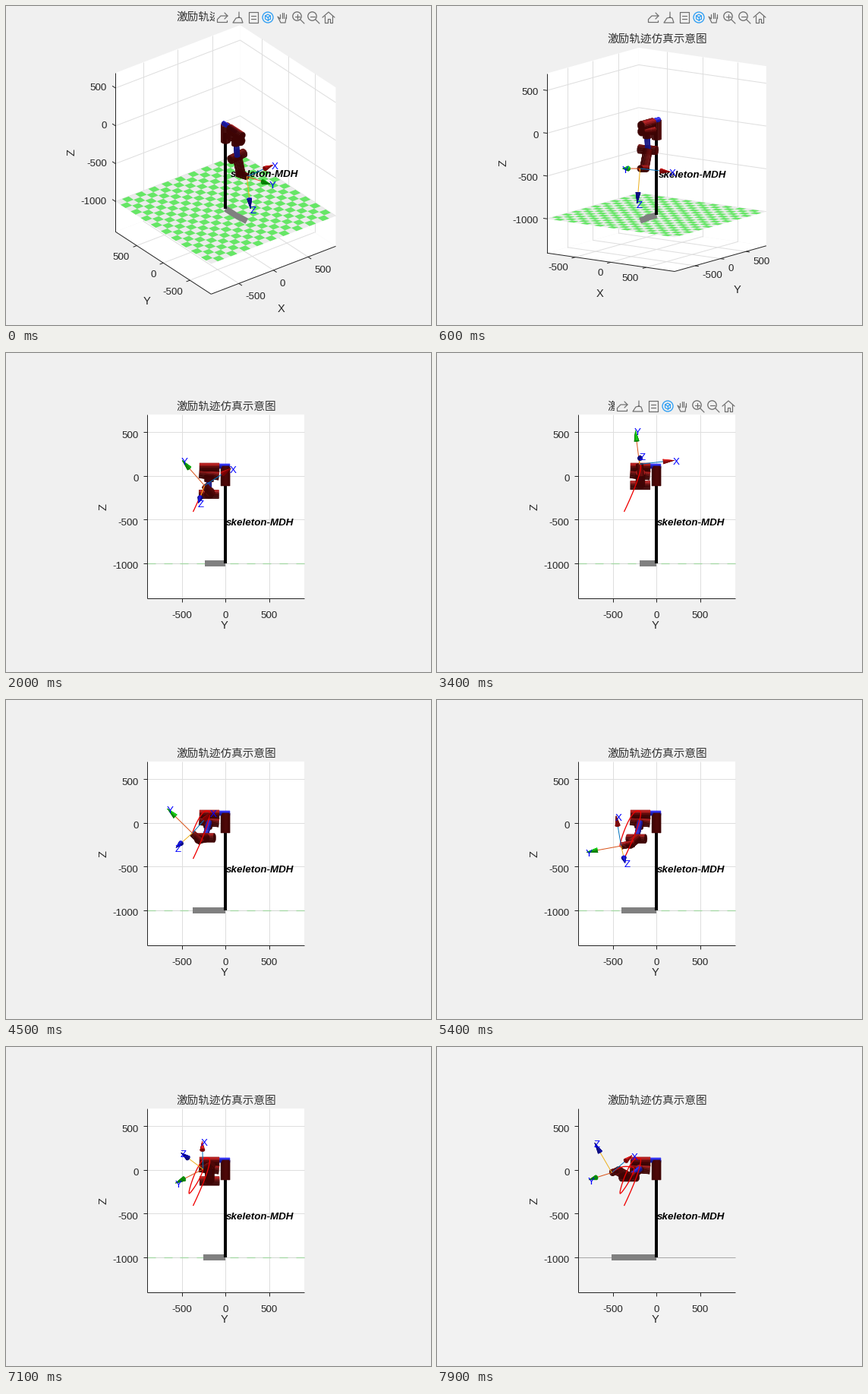
Write a matplotlib script that moves like this. It is 560 px wide and 420 px high and loops after 8 s.

```python
import numpy as np
import matplotlib.pyplot as plt
from matplotlib.animation import FuncAnimation
from matplotlib.collections import LineCollection, PolyCollection
from matplotlib.patches import Circle, Polygon, Rectangle

W, H, FRAMES = 560, 420, 80
PX = 0.72                       # points per pixel at 100 dpi
SCALE, CX, CY = 0.115, 289.4, 202.2
LIM, ZLO, ZHI, FLOOR = 900, -1400, 700, -1000
MID = np.array([0, 0, -350])
TICKS, ZTICKS = (-500, 0, 500), (-1000, -500, 0, 500)
TILES = 19
INK, GRAY, ICON, HOT = '#262626', '#f0f0f0', '#6e6e6e', '#2a9df4'
RED, BLUE = np.array([1, 0.06, 0.06]), np.array([0.15, 0.15, 1])
LIGHT = np.array([0.6, 0, 0.8])
SHOULDER, LINK, HAND = np.array([0, -190, 15]), 226, 100


def unit(v):
    return v / max(np.linalg.norm(v), 1e-9)


def swing(t, *turns):
    """Cosine motion between (time, value) turning points."""
    ts, vs = zip(*turns)
    i = int(np.clip(np.searchsorted(ts, t) - 1, 0, len(ts) - 2))
    u = np.clip((t - ts[i]) / (ts[i + 1] - ts[i]), 0, 1)
    return vs[i] + (vs[i + 1] - vs[i]) * (1 - np.cos(np.pi * u)) / 2


def tool_at(t):
    return np.array([
        swing(t, (3, 20), (32, 340), (90, 250)),
        swing(t, (2, -373), (31, -182), (50, -420), (72, -258), (84, -663)),
        swing(t, (2, -410), (36, 140), (51.5, -270), (76, 40), (86, -300))])


def tool_axes(t):
    """Heading in the side plane, lean towards the viewer, roll about Y."""
    a = np.radians(swing(t, (5, 170), (34, 97), (62, 212), (90, 190)))
    b = np.radians(swing(t, (4, 5), (19, 17), (34, -14), (52, 2), (88, -55)))
    r = np.radians(swing(t, (4, 90), (31, -7), (47, 40), (85, -80)))
    y = np.array([np.sin(b), np.cos(b) * np.cos(a), np.cos(b) * np.sin(a)])
    side = np.array([np.cos(b), -np.sin(b) * np.cos(a), -np.sin(b) * np.sin(a)])
    z = np.cos(r) * side + np.sin(r) * np.array([0, -np.sin(a), np.cos(a)])
    return np.cross(y, z), y, z


def elbow_at(wrist):
    """Two equal links, the elbow hanging down."""
    reach = wrist - SHOULDER
    d = unit(reach)
    down = np.array([0, 0, -1])
    sag = np.sqrt(max(0, LINK**2 - reach @ reach / 4))
    return SHOULDER + reach / 2 + sag * unit(down - d * (d @ down))


class View:
    """Orthographic camera that turns to the side view."""

    def __init__(self, n):
        self.az = min(90, -37.5 + 12.2 * n)
        self.el = max(0, 30 - 3.07 * n)
        a, e = np.radians([self.az, self.el])
        sa, ca, se, ce = np.sin(a), np.cos(a), np.sin(e), np.cos(e)
        self.m = np.round([(ca, sa, 0), (-sa * se, ca * se, ce),
                           (sa * ce, -ca * ce, se)], 6)
        self.cam = self.m[2]

    def __call__(self, pts):
        q = (np.asarray(pts, float) - MID) @ self.m.T
        return np.stack([CX + SCALE * q[..., 0], CY - SCALE * q[..., 1]], -1)

    def dir(self, v, fallback):
        d = self.m[:2] @ np.array(v, float) * (1, -1)
        return unit(d) if np.linalg.norm(d) > 0.02 else np.array(fallback, float)


class Solids:
    """Collects lit facets and paints them back to front."""

    def __init__(self, view):
        self.view, self.items = view, []

    def face(self, pts, normal, color, ambient):
        if normal @ self.view.cam <= 0:
            return
        lit = max(0, normal @ LIGHT) ** 4
        rgb = np.clip(color * (ambient + 0.4 * lit) + 0.1 * lit, 0, 1)
        self.items.append((pts.mean(0) @ self.view.cam, self.view(pts), rgb))

    def tube(self, a, b, r0, r1, color, ambient=0.24, sides=20):
        a, b = np.array(a, float), np.array(b, float)
        axis = unit(b - a)
        u = unit(np.cross(axis, (0, 0, 1) if abs(axis[2]) < 0.9 else (1, 0, 0)))
        w = np.cross(axis, u)
        t = np.linspace(0, 2 * np.pi, sides + 1)[:, None]
        ring = np.cos(t) * u + np.sin(t) * w
        lo, hi = a + r0 * ring, b + r1 * ring
        slope = axis * (r0 - r1) / max(np.linalg.norm(b - a), 1)
        for i in range(sides):
            quad = np.array([lo[i], lo[i + 1], hi[i + 1], hi[i]])
            self.face(quad, unit(ring[i] + ring[i + 1] + 2 * slope), color, ambient)
        self.face(lo, -axis, color, ambient)
        if r1:
            self.face(hi, axis, color, ambient)

    def joint(self, center, axis, half, r):
        d = unit(np.array(axis, float)) * half
        self.tube(center - d, center + d, r, r, RED)

    def paint(self, z):
        self.items.sort(key=lambda f: f[0])
        _, polys, cols = zip(*self.items)
        ax.add_collection(PolyCollection(polys, facecolors=cols, edgecolors=cols,
                                         linewidths=0.3, zorder=z))


fig = plt.figure(figsize=(W / 100, H / 100), dpi=100, facecolor=GRAY)
ax = fig.add_axes([0, 0, 1, 1])


def line(pts, color, width, z, cap='butt'):
    p = np.asarray(pts)
    ax.plot(p[:, 0], p[:, 1], color=color, lw=width * PX, zorder=z,
            solid_capstyle=cap, solid_joinstyle='round')


def lines(segments, color, width, z):
    ax.add_collection(LineCollection(segments, colors=color,
                                     linewidths=width * PX, zorder=z))


def label(x, y, s, size=13.33, color=INK, z=9, ha='center',
          font='Liberation Sans', **kw):
    ax.text(x, y + 0.36 * size, s, fontsize=size * PX, color=color, ha=ha,
            va='baseline', family=font, zorder=z, **kw)


def rect(axis, at, lo, hi):
    """Corners of a box-wide rectangle that is constant along one axis."""
    corners = [[-LIM, lo], [LIM, lo], [LIM, hi], [-LIM, hi]]
    return np.insert(np.array(corners, float), axis, at, axis=1)


def draw_box(view):
    """White back walls with grid lines."""
    bx = LIM if view.az < 0 else -LIM
    for wall in (rect(0, bx, ZLO, ZHI), rect(1, LIM, ZLO, ZHI), rect(2, ZLO, -LIM, LIM)):
        ax.add_patch(Polygon(view(wall), fc='white', ec='none', zorder=1))
    grid = [[(bx, t, ZLO), (bx, t, ZHI)] for t in TICKS]
    grid += [[(bx, -LIM, t), (bx, LIM, t)] for t in ZTICKS]
    if view.az < 89:
        grid += [[(t, LIM, ZLO), (t, LIM, ZHI)] for t in TICKS]
        grid += [[(-LIM, LIM, t), (LIM, LIM, t)] for t in ZTICKS]
    if view.el > 0:
        grid += [[(t, -LIM, ZLO), (t, LIM, ZLO)] for t in TICKS]
        grid += [[(-LIM, t, ZLO), (LIM, t, ZLO)] for t in TICKS]
    lines(view(grid), '#dedede', 1, 2)


def draw_floor(view, washed):
    edge = np.linspace(-LIM, LIM, TILES + 1)
    if view.el == 0:
        row = view([(0, y, FLOOR) for y in edge])
        line(row, '#a8a8a8' if washed else '#d2d6d2', 1, 3)
        if not washed:
            lines([row[i:i + 2] for i in range(0, TILES, 2)], '#a4d8a4', 1.3, 3)
        return
    ax.add_patch(Polygon(view(rect(2, FLOOR, -LIM, LIM)), fc='#ebebeb', ec='none', zorder=3))
    tiles = [[(edge[i + a], edge[j + b], FLOOR) for a, b in ((0, 0), (1, 0), (1, 1), (0, 1))]
             for i in range(TILES) for j in range(TILES) if (i + j) % 2]
    ax.add_collection(PolyCollection(view(tiles), facecolors='#66e666', zorder=3))


def draw_axes(view):
    fx = -LIM if view.az < 0 else LIM

    def ruler(ends, points, out, fallback):
        """Axis line with ticks; returns the outward direction and label spots."""
        d = view.dir(out, fallback)
        spots = view(points)
        line(view(ends), INK, 1, 8)
        lines([(p, p + 5 * d) for p in spots], INK, 1, 8)
        return d, spots

    def flat(name, ends, points, out, shift):
        d, spots = ruler(ends, points, out, (0, 1))
        ha = 'center' if abs(d[0]) < 0.2 else 'left' if d[0] > 0 else 'right'
        for v, (x, y) in zip(TICKS, spots):
            label(x + 10 * d[0], y + 10 + 11 * abs(d[1]), str(v), ha=ha)
        x, y = view(ends).mean(0)
        label(x + shift * d[0] - 2 * d[1], y + 34.5 + view.el / 2, name, 14.67)

    if view.az < 86:
        flat('X', [(-LIM, -LIM, ZLO), (LIM, -LIM, ZLO)],
             [(t, -LIM, ZLO) for t in TICKS], (0, -1, 0), 14)
    flat('Y', [(fx, -LIM, ZLO), (fx, LIM, ZLO)],
         [(fx, t, ZLO) for t in TICKS], (np.sign(fx), 0, 0), 23)

    ends = [(-LIM, -fx, ZLO), (-LIM, -fx, ZHI)]
    out = (0, 1, 0) if view.az < 0 else (-1, 0, 0)
    d, spots = ruler(ends, [(-LIM, -fx, t) for t in ZTICKS], out, (-1, 0))
    for v, (x, y) in zip(ZTICKS, spots):
        label(x - 11.5, y + 2.4 + 7 * d[1], str(v), ha='right')
    x, y = view(ends).mean(0)
    ax.text(x - 57.5, y, 'Z', fontsize=14.67 * PX, color=INK, rotation=90,
            ha='center', va='center', family='Liberation Sans', zorder=9)


def draw_toolbar(right, y):
    """Export, brush, tips, rotate, pan, zoom in, zoom out and home."""
    ax.add_patch(Rectangle((right - 160, y - 10), 160, 19.5, fc=GRAY, ec='none', zorder=11))
    xs = right - 10 - 20 * np.arange(7, -1, -1)

    def stroke(i, *pts, color=ICON):
        line(np.array(pts) + (xs[i], y), color, 1.2, 12, 'round')

    def ring(i, r, shift=0, color=ICON):
        ax.add_patch(Circle((xs[i] + shift, y + shift), r, fc='none', ec=color,
                            lw=1.3 * PX, zorder=12))

    stroke(0, (-7, 2), (-7, 6), (6, 6), (6, 4))
    stroke(0, (-6, 2), (-2, -2), (7, -2), (3, -6))
    stroke(0, (7, -2), (3, 2))
    stroke(1, (2, -7), (2, 0), (-2, 1), (-6, 7), (7, 7), (5, 1), (2, 0))
    stroke(2, (-5, -7), (7, -7), (7, 7), (-5, 7), (-5, -7))
    for dy in (-2, 2):
        stroke(2, (-2, dy), (4, dy))
    ring(3, 7, color=HOT)
    cube = [4 * np.array([np.cos(a), np.sin(a)]) for a in np.pi / 6 + np.pi / 3 * np.arange(7)]
    stroke(3, *cube, color=HOT)
    for corner in cube[1:6:2]:
        stroke(3, (0, 0), corner, color=HOT)
    for k in range(4):
        stroke(4, (2.4 * k - 3.6, 1), (2.4 * k - 3.6, -4 - 2 * (k in (1, 2))))
    stroke(4, (-3.6, 2), (-7, -1), (-3, 7), (3, 7), (4, 0))
    for i in (5, 6):
        ring(i, 5.7, -1.5)
        stroke(i, (3, 3), (8, 8))
        stroke(i, (-4.5, -1.5), (1.5, -1.5))
    stroke(5, (-1.5, -4.5), (-1.5, 1.5))
    stroke(7, (-8, 0), (0, -7), (8, 0))
    for s in (-1, 1):
        stroke(7, (5 * s, -2), (5 * s, 7), (1.5 * s, 7), (1.5 * s, 2), (0, 2))


def draw_robot(view, n):
    tool, (tx, ty, tz) = tool_at(n), tool_axes(n)
    wrist = tool - HAND * ty
    elbow = elbow_at(wrist)

    track = np.array([(0, 0, 0), SHOULDER, elbow, wrist, tool])
    track[:, 2] = FLOOR
    line(view(track), '#808080', 8, 4)
    line(view([(0, 0, FLOOR), (0, 0, 0)]), 'black', 4, 5)
    x, y = view((0, 0, -500))
    label(x + 0.6 + view.el / 5, y + 2.6, 'skeleton-MDH', color='black', z=6, ha='left',
          weight='bold', style='italic')

    body = Solids(view)
    body.joint(np.zeros(3), (0, 0, 1), 112, 52)
    body.tube((0, 45, 112), (0, -190, 112), 25, 25, BLUE, 0.6)
    body.joint(np.array([0, -190, 95]), (0, 1, 0), 113, 52)
    body.joint(SHOULDER, (0, 1, -0.1), 113, 50)
    body.tube(SHOULDER, SHOULDER + 0.35 * (elbow - SHOULDER), 50, 50, RED)
    body.tube(SHOULDER, elbow, 30, 30, BLUE, 0.5)
    body.joint(elbow, np.cross(wrist - SHOULDER, (0, 0, 1)), 112, 50)
    body.tube(elbow, wrist, 52, 52, RED)
    body.tube(wrist - 50 * ty, tool, 38, 38, RED)
    body.paint(7)

    if n > 0:
        path = [tool_at(t) for t in np.linspace(0, n, 2 * n + 2)]
        line(view(path), '#f00000', 1.3, 7.2)

    tips = Solids(view)
    colors = ('#0072bd', '#d95319', '#edb120')
    for d, name, shaft, cone in zip((tx, ty, tz), 'XYZ', colors, np.eye(3)):
        end = tool + 400 * d
        line(view([tool, end]), shaft, 1, 7.4)
        tips.tube(end - 125 * d, end, 28, 0, cone, 0.48, 14)
        x, y = view(end)
        label(x + 3, y + 1, name, color='#0000ff', z=7.8)
    tips.paint(7.6)


def draw(n):
    ax.clear()
    ax.set(xlim=(0, W), ylim=(H, 0))
    ax.axis('off')
    washed = n >= 78
    fig.set_facecolor('#f2f2f2' if washed else GRAY)

    view = View(n)
    if not washed:
        draw_box(view)
    draw_floor(view, washed)
    draw_axes(view)
    draw_robot(view, n)

    top = view(rect(2, ZHI, -LIM, LIM))[:, 1].min()
    label(290, top - 12, '激励轨迹仿真示意图', 14.67, color='#333333', z=10,
          font='Noto Sans CJK JP')
    if view.az < 90:
        draw_toolbar(435, 15)
    elif 31 <= n <= 34:
        draw_toolbar(394, 70)
    return []


anim = FuncAnimation(fig, draw, frames=FRAMES, interval=100, init_func=lambda: [],
                     repeat=True, repeat_delay=0)
plt.show()
```
